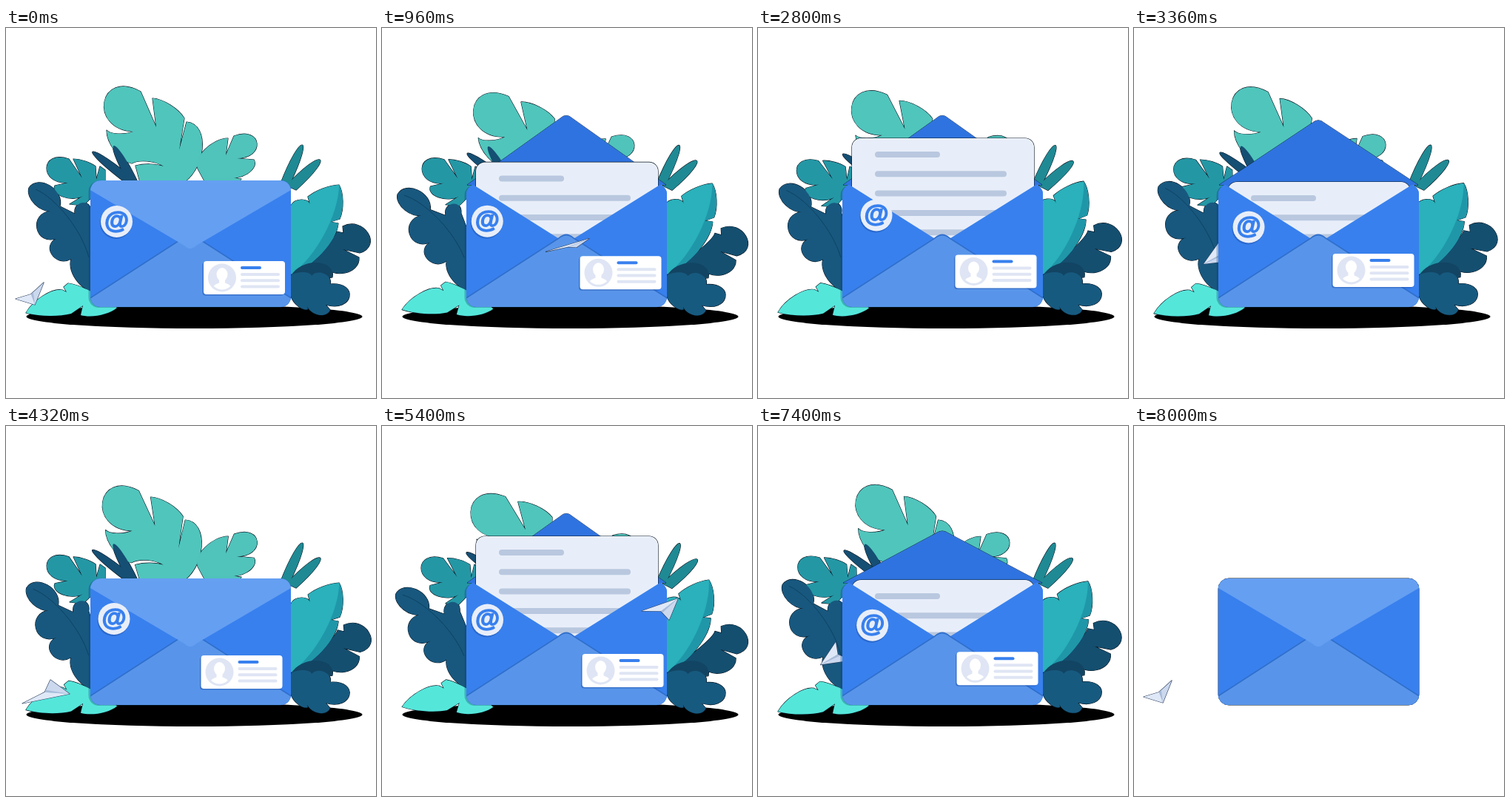
Animation, 500 px wide and 500 px high, one loop 8040 ms. Source, as an HTML page with a canvas:

```html
<!DOCTYPE html>
<html lang="en">
<head>
<meta charset="utf-8">
<title>Envelope</title>
<style>
html, body { margin: 0; width: 100%; height: 100%; overflow: hidden; background: #fff; }
canvas { display: block; width: 500px; height: 500px; }
</style>
</head>
<body>
<canvas id="stage" width="500" height="500"></canvas>
<script>
const ctx = document.getElementById('stage').getContext('2d');
const LOOP = 8040, CYCLE = 4000, END = 8000, STEP = 40, TAU = Math.PI * 2;
const BACK = '#2f73e0', SIDE = '#3880ee', FRONT = '#5895ea', FLAP = '#659ff2';
const PALE = '#e8eef9', LINE = '#b9c8df', MIST = '#dfe5f4', SHADE = 'rgba(25,75,165,.45)';

const clamp = v => Math.max(0, Math.min(1, v));
const lerp = (a, b, u) => a + (b - a) * u;
const ease = (t, from, to) => {
  const u = clamp((t - from) / (to - from));
  return u * u * (3 - 2 * u);
};

// Periodic smooth curve through keys [time, ...values].
function track(keys, t) {
  const n = keys.length;
  const key = i => {
    const turn = Math.floor(i / n), k = keys[i - turn * n];
    return [k[0] + turn * CYCLE, ...k.slice(1)];
  };
  const i = keys.findLastIndex(k => k[0] <= t);
  const [a, b, c, d] = [key(i - 1), key(i), key(i + 1), key(i + 2)];
  const h = c[0] - b[0], u = (t - b[0]) / h, v = 1 - u;
  return b.slice(1).map((p, j) => {
    const q = c[j + 1];
    const m0 = (q - a[j + 1]) / (c[0] - a[0]) * h;
    const m1 = (d[j + 1] - p) / (d[0] - b[0]) * h;
    return v * v * ((1 + 2 * u) * p + u * m0) + u * u * ((1 + 2 * v) * q - v * m1);
  });
}

// Corners joined by straight edges; "~x,y" between two corners makes
// a round lobe that reaches that point.
function outline(text) {
  const path = new Path2D();
  let from = null, tip = null;
  for (const word of text.split(' ')) {
    const p = word.replace('~', '').split(',').map(Number);
    if (word[0] === '~') { tip = p; continue; }
    if (!from) path.moveTo(...p);
    else if (!tip) path.lineTo(...p);
    else {
      const reach = [0, 1].map(k => tip[k] - (from[k] + p[k]) / 2);
      const chord = [0, 1].map(k => from[k] - p[k]);
      const spread = Math.min(.25, .7 * Math.hypot(...reach) / Math.hypot(...chord) - .33);
      const pull = (end, side) => [0, 1].map(k => end[k] + reach[k] * 4 / 3 + side * spread * chord[k]);
      path.bezierCurveTo(...pull(from, 1), ...pull(p, -1), ...p);
    }
    from = p;
    tip = null;
  }
  path.closePath();
  return path;
}

// A leaf swings by `turn` degrees round its foot and is farthest out at `peak`.
const leaf = (color, foot, turn, peak, shape, extra) =>
  ({ color, foot, turn, peak, shape: outline(shape), ...extra });

const leaves = [
  leaf('#50c5bc', [246, 205], -8.6, 1750,
    '172,140 ~133,100 182,86 203,134 198,95 ~222,104 241,122 234,165 244,127 ~265,164 235,212 ' +
    '182,212 175,186 ~195,184 213,187 ~191,180 170,183 ~147,166 136,138 ~151,143 172,140'),
  leaf('#50c3bb', [275, 215], 4, 2000,
    '259,190 ~269,164 300,149 297,172 308,146 ~339,156 311,176 335,178 ~326,197 298,201 318,204 ' +
    '310,214 272,214 259,190'),
  leaf('#2497a5', [130, 240], -4, 2250,
    '84,209 ~55,189 85,177 103,203 91,177 ~107,180 121,187 122,205 127,187 134,192 134,212 ' +
    '104,240 86,238 104,227 ~77,228 66,213 84,209'),
  leaf('#154f73', [175, 215], -4.5, 2000, '160,208 ~118,167 177,208'),
  leaf('#154f73', [175, 215], -4.5, 2000, '165,208 ~146,159 178,208'),
  leaf('#18587f', [115, 320], -8.5, 1500,
    '62,247 ~39,238 31,216 ~59,213 73,241 93,251 ~104,236 114,250 125,290 125,356 ~97,343 88,312 ' +
    '~62,306 70,284 ~42,271 62,247',
    { veins: outline('40,218 ~83,255 112,310 ~83,255 40,218') }),
  leaf('#55e6da', [120, 385], 4, 1500,
    '27,385 ~50,362 76,354 82,357 78,350 84,345 ~115,356 150,378 ~127,388 101,388 104,375 88,386 ~58,389 27,385'),
  leaf('#1f8a94', [380, 215], 2.3, 2000, '371,210 ~400,158 384,210'),
  leaf('#1f8a94', [380, 215], 3.3, 2000, '379,213 ~424,178 392,219'),
  leaf('#144f70', [400, 335], 4.5, 1200,
    '390,328 ~428,298 447,275 456,277 455,268 ~489,277 478,304 455,299 477,310 ~458,331 430,320 390,328'),
  leaf('#2ab1bb', [385, 335], -6, 2200,
    '450,212 ~455,234 451,258 438,262 449,264 ~427,304 385,333 380,300 385,240 ~399,232 411,239 ' +
    '408,228 ~428,217 450,212',
    { dark: outline('450,212 480,212 480,333 385,333 ~430,279 450,212') }),
  leaf('#124563', [385, 340], 1, 1200, '385,335 ~420,317 441,337 385,345'),
  leaf('#175a80', [385, 350], 1, 1200,
    '385,334 ~402,330 413,335 ~430,332 438,346 ~464,363 432,374 438,381 ~420,387 406,371 408,380 ~395,376 385,362')
];

const badgeKeys = [[0, 149.5, 261.5], [320, 146, 260.5], [1400, 142.5, 262],
  [2080, 157.5, 264.5], [2800, 160, 253], [3360, 155, 269]];
const cardKeys = [[0, 267, 315], [320, 263.5, 310], [1400, 270.5, 308],
  [2080, 272, 308.5], [2800, 266.5, 306.5], [3360, 268.5, 305]];

// time, nose, left wing, right wing
const planeKeys = [
  [0, 39, 374, 13, 366, 51, 344],
  [320, 86, 362, 22, 375, 60, 343],
  [1400, 400, 233, 351, 250, 388, 262],
  [2080, 469, 186, 431, 195, 424, 214],
  [2400, 438, 236, 470, 215, 468, 241],
  [3360, 94, 319, 116, 288, 136, 314]
];

function fill(path, color) {
  ctx.fillStyle = color;
  ctx.fill(path);
}

function edge(path, width = 1.2, color = '#071420') {
  ctx.strokeStyle = color;
  ctx.lineWidth = width;
  ctx.lineJoin = 'round';
  ctx.stroke(path);
}

function rounded(x, y, w, h, r) {
  const path = new Path2D();
  path.roundRect(x, y, w, h, r);
  return path;
}

function oval(x, y, rx, ry = rx) {
  const path = new Path2D();
  path.ellipse(x, y, rx, ry, 0, 0, TAU);
  return path;
}

const bar = (color, x, y, w, h) => fill(rounded(x, y, w, h, h / 2), color);
const polygon = (...points) => new Path2D('M' + points.map(p => p.join(' ')).join('L') + 'Z');

function drawLeaves(t) {
  const each = paint => leaves.forEach(l => {
    const swing = (Math.cos((t - l.peak) / CYCLE * TAU) - Math.cos(l.peak / CYCLE * TAU)) / 2;
    ctx.save();
    ctx.translate(...l.foot);
    ctx.rotate(swing * l.turn * TAU / 360);
    ctx.translate(-l.foot[0], -l.foot[1]);
    paint(l);
    ctx.restore();
  });
  each(l => edge(l.shape));
  each(l => {
    fill(l.shape, l.color);
    ctx.clip(l.shape);
    if (l.dark) fill(l.dark, '#1f97a9');
    if (l.veins) edge(l.veins, .9, '#104768');
  });
}

function drawPlane(t) {
  const [nx, ny, ax, ay, bx, by] = track(planeKeys, t);
  const nose = [nx, ny], left = [ax, ay], right = [bx, by];
  const between = (p, q, u) => p.map((v, k) => lerp(v, q[k], u));
  const notch = between(between(left, right, .5), nose, .25);
  const fold = between(notch, right, .18);
  edge(polygon(nose, left, notch, right), 1.2, '#2b3d5c');
  fill(polygon(nose, left, notch), '#dfe8f7');
  fill(polygon(nose, notch, right), '#cbd8ee');
  fill(polygon(nose, notch, fold), '#a9bbd9');
}

function drawPaper(y) {
  const paper = rounded(127, y, 246, 150, 12);
  edge(paper);
  fill(paper, PALE);
  for (let i = 0; i < 5; i++) bar(LINE, 158, y + 18 + i * 26.3, i ? 178 : 88, 8);
}

function drawFlap(open) {
  const k = Math.abs(1 - 2 * open), y = v => 212 + (v - 212) * k;
  if (open < .5) {
    fill(new Path2D(`M114 ${y(219)}Q116 ${y(206)} 130 ${y(206)}H369Q383 ${y(206)} 385 ${y(219)}` +
      `L257 ${y(294)}Q249 ${y(302)} 241 ${y(294)}Z`), FLAP);
  } else {
    const flap = new Path2D(`M115 212L241 ${y(122)}Q249 ${y(114.5)} 257 ${y(122)}L384 212Z`);
    edge(flap, .8);
    fill(flap, BACK);
  }
}

function drawFront(body) {
  const pocket = y => new Path2D(`M112 ${y + 88}L239 ${y + 6}Q249 ${y - 3} 259 ${y + 6}L387 ${y + 88}V380H112Z`);
  ctx.save();
  ctx.clip(body);
  fill(polygon([114, 206], [122, 211], [249, 291], [377, 211], [385, 206], [385, 377], [114, 377]), SIDE);
  fill(pocket(277), '#2f6ecb');
  fill(pocket(279), FRONT);
  ctx.restore();
}

function drawBadge(x, y) {
  fill(oval(x - 1, y + 2, 21.5), SHADE);
  fill(oval(x, y, 21.5), PALE);
  ctx.font = 'bold 34px "Liberation Sans", Arial, sans-serif';
  ctx.fillStyle = ctx.strokeStyle = SIDE;
  ctx.lineWidth = 1.4;
  const m = ctx.measureText('@');
  const left = x + (m.actualBoundingBoxLeft - m.actualBoundingBoxRight) / 2;
  const base = y + (m.actualBoundingBoxAscent - m.actualBoundingBoxDescent) / 2;
  ctx.fillText('@', left, base);
  ctx.strokeText('@', left, base);
}

function drawCard(x, y) {
  const cx = x + 25, cy = y + 22.5;
  fill(rounded(x - 1.5, y + 1.5, 110, 45, 4), SHADE);
  fill(rounded(x, y, 110, 45, 4), '#fff');
  fill(oval(cx, cy, 19), MIST);
  ctx.save();
  ctx.clip(oval(cx, cy, 16));
  fill(oval(cx, cy - 4.5, 7.5, 9), '#fff');
  fill(rounded(cx - 4, cy + 1, 8, 8, 2), '#fff');
  fill(oval(cx, cy + 15.5, 13, 9), '#fff');
  ctx.restore();
  bar(SIDE, x + 50, y + 7, 28, 4);
  for (let i = 0; i < 3; i++) bar(MIST, x + 50, y + 16 + i * 8.2, 53, 4);
}

function draw(time) {
  const t = time % CYCLE, full = time < END;
  const open = ease(t, 340, 700) - ease(t, 3320, 3680);
  const lift = ease(t, 680, 1280) - ease(t, 2800, 3320);
  const behind = t > 2250 && t < 3760;

  ctx.clearRect(0, 0, 500, 500);
  if (full) {
    fill(oval(254.5, 390, 227, 16), '#000');
    drawLeaves(t);
  }
  if (behind) drawPlane(t);

  const top = lerp(206, 211, clamp(open * 4));
  const body = rounded(114, top, 271, 377 - top, 14);
  if (full) {
    // soft shadow that only falls on the leaves
    ctx.globalCompositeOperation = 'source-atop';
    fill(rounded(111.5, top + 1, 271, 377 - top, 14), 'rgba(10,60,90,.3)');
    ctx.globalCompositeOperation = 'source-over';
  } else {
    edge(body, 1);
  }
  if (open >= .5) drawFlap(open);
  fill(body, BACK);
  if (open > 0) drawPaper(lerp(208, 149, lift));
  drawFront(body);
  if (open < .5) drawFlap(open);

  if (full) {
    drawBadge(...track(badgeKeys, t));
    drawCard(...track(cardKeys, t));
  }
  if (!behind) drawPlane(t);
}

const start = performance.now();
function tick() {
  const time = (performance.now() - start) % LOOP;
  draw(Math.floor(time / STEP) * STEP);
  requestAnimationFrame(tick);
}
tick();
</script>
</body>
</html>
```
